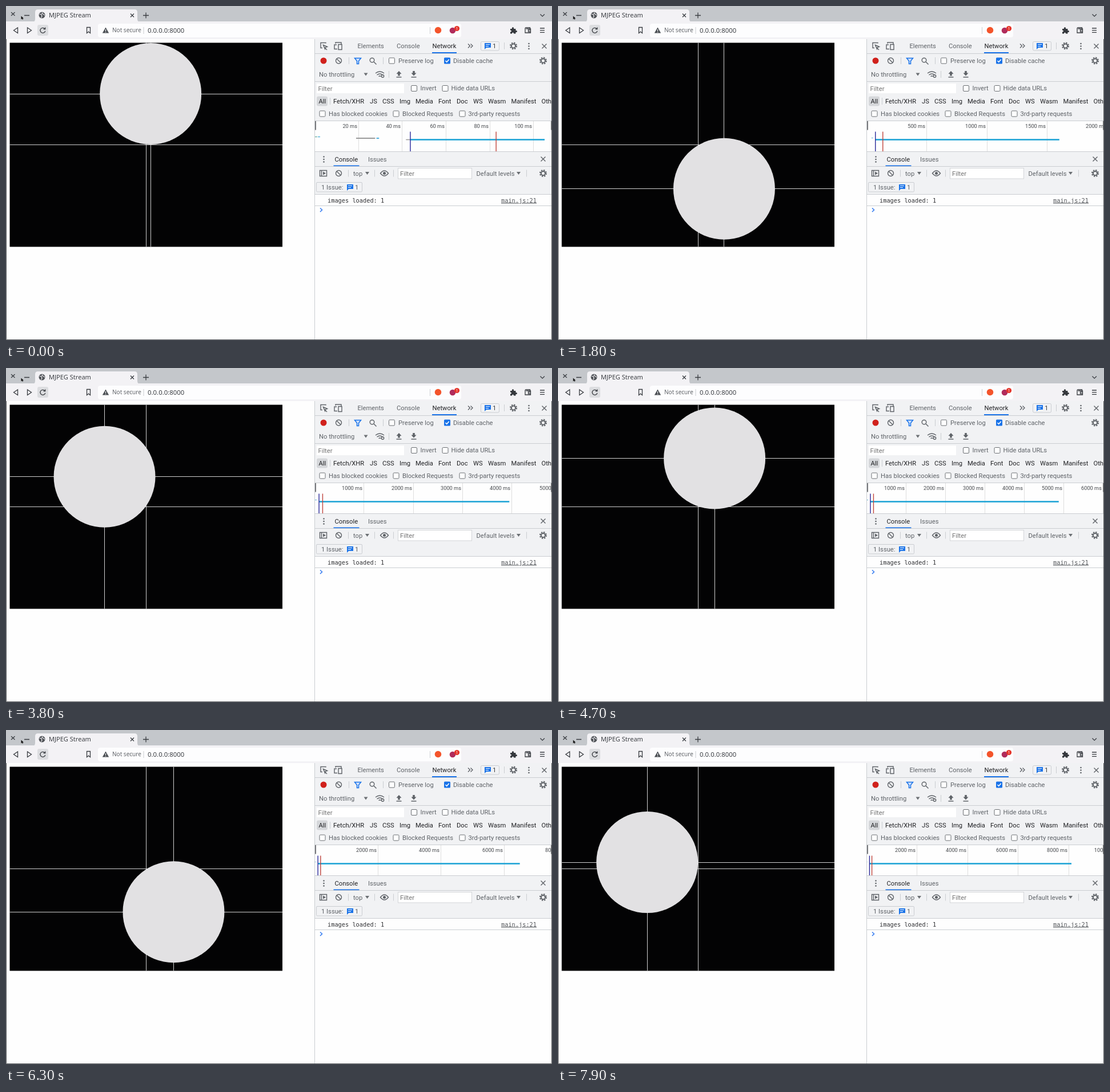
An HTML page that plays this animation: 956 by 586 pixels, repeating every 8000 ms.

```html
<!DOCTYPE html>
<html lang="en">
<head>
<meta charset="utf-8">
<title>MJPEG Stream</title>
<style>
  html, body { margin: 0; width: 100%; height: 100%; overflow: hidden; background: #fefefe; }
  svg { display: block; }
  text { font: 11.2px Roboto, Arial, sans-serif; fill: #5f6368; white-space: pre; }
  .ui { font-family: "Noto Sans", "Open Sans", sans-serif; fill: #3c3f44; }
  .dark { fill: #202124; }
  .mono { font: 10.3px "DejaVu Sans Mono", monospace; fill: #303134; }
  .tick { font-size: 9.25px; fill: #45484c; text-anchor: end; }
  .icon { fill: none; stroke: #5f6368; stroke-width: 1.4; }
  .ink { fill: none; stroke: #3a3d42; stroke-width: 1.3; }
  .rule { stroke: #cacdd1; fill: none; }
  .cross { stroke: #d0d0d0; fill: none; }
</style>
</head>
<body>
<svg width="956" height="586" viewBox="0 0 956 586">
  <defs>
    <clipPath id="view"><rect x="6.5" y="64.5" width="477.5" height="358"/></clipPath>
    <clipPath id="chart"><rect x="541" y="202" width="414" height="53"/></clipPath>
    <g id="gear" class="icon">
      <circle r="3.6" stroke-width="2"/>
      <circle r="5.5" stroke-width="2" stroke-dasharray="2.4 1.92"/>
    </g>
    <rect id="box" x="-5" y="-5" width="10" height="10" rx="1.5" fill="#fff" stroke="#6b6f73"/>
    <g id="ban" class="icon"><circle r="5"/><path d="M-3.5-3.5l7 7"/></g>
    <path id="close" class="icon" d="M-4-4l8 8M4-4l-8 8"/>
    <path id="drop" d="M-3.5-2.5h7l-3.5 5z" fill="#6b6f73"/>
    <g id="dots" fill="#5f6368"><circle cy="-4.5" r="1.3"/><circle r="1.3"/><circle cy="4.5" r="1.3"/></g>
    <g id="note">
      <path d="M-5.5-5h11v8h-8l-3 3z" fill="#1a73e8"/>
      <path d="M-3.5-2.5h7M-3.5 .5h5" stroke="#fff"/>
    </g>
    <path id="bar" class="rule" d="M0-6v12" stroke="#bbb"/>
  </defs>

  <!-- browser frame -->
  <rect width="956" height="586" fill="#fefefe"/>
  <rect width="956" height="28" fill="#c4c7cb"/>
  <path d="M46 28q5 0 5-5v-12q0-5 5-5h169q5 0 5 5v12q0 5 5 5z" fill="#f3f2f5"/>
  <rect y="27" width="956" height="31" fill="#f3f2f5"/>
  <rect x="161" y="31" width="636" height="24" rx="4" fill="#fdfdfe"/>
  <path class="ink" d="M9 11l6.500 6M15.500 11l-6.500 6M32 16.500h9" stroke="#555"/>
  <path d="M26.500 17.500v6l1.500-1.300 1 1.800 1-.5-.9-1.700h1.900z" fill="#111"/>
  <circle cx="63" cy="16" r="5.500" fill="#505358"/>
  <path d="M58.500 14l3.500 1 1 3-1.500 2.500M64 11.500l-1 2 3 1 1.500 2" fill="none" stroke="#f3f2f5" stroke-width="1.200"/>
  <text class="ui" x="75" y="20" style="font-size:11.050px">MJPEG Stream</text>
  <path class="ink" d="M218 13.500l6 6M224 13.500l-6 6M240 16.500h10M245 11.500v10" stroke-width="1.600"/>
  <path class="ink" d="M935.500 14.500l3.700 3.700 3.700-3.700" stroke-width="1.500"/>

  <path class="ink" d="M20.500 38v9.500l-7-4.700z"/>
  <path class="ink" d="M37.500 38v9.500l7-4.700z" stroke="#c3c5c8"/>
  <rect x="55" y="33" width="19" height="19" rx="3" fill="#dcdde0"/>
  <path class="ink" d="M68 40a4.500 4.500 0 1 0 .8 4M68.700 37.500v3.200h-3.200"/>
  <path class="ink" d="M141.500 37.500h6v10l-3-2.500-3 2.500z"/>
  <path d="M174.500 37.500l5.700 10h-11.400z" fill="#4c5055"/>
  <path d="M174.500 41v3M174.500 45v1.200" stroke="#fff" stroke-width="1.200"/>
  <text class="ui" x="186" y="46.300" style="font-size:10px;fill:#606368">Not secure</text>
  <use href="#bar" x="241" y="43"/>
  <text class="ui" x="248" y="46.500" style="font-size:11.400px">0.0.0.0:8000</text>
  <use href="#bar" x="742.500" y="43"/>
  <circle cx="756.500" cy="42.500" r="5.800" fill="#f4542b"/>
  <circle cx="782" cy="43" r="5.300" fill="#b02c5c"/>
  <circle cx="789.500" cy="39.500" r="4.600" fill="#e5352b"/>
  <text x="789.500" y="42" text-anchor="middle" style="font-size:6.500px;fill:#fff">1</text>
  <path d="M883 40h3q-.6-2.700 1.500-2.700t1.500 2.700h3.500v3q2.500-.5 2.500 1.500t-2.500 1.500v2.500h-3.500q0-2-1.500-2t-1.500 2h-3v-3q2-.3 2-1.500t-2-1.500z" fill="#35383d"/>
  <path class="ink" d="M909 39.500q0-1.500 1.500-1.500h7v2h-7M909 39.500v7.500h9.500v-7h-8M918.500 42h-4v3h4"/>
  <path class="ink" d="M935 39h8M935 42.700h8M935 46.400h8"/>

  <!-- streamed picture -->
  <g clip-path="url(#view)">
    <rect x="6" y="64" width="479" height="359" fill="#030304"/>
    <path class="cross" d="M6 243.500h478M245.500 64v359"/>
    <path class="cross" id="sight"/>
    <circle id="ball" r="89" fill="#e2e1e3"/>
  </g>

  <!-- inspector -->
  <rect x="540" y="58" width="416" height="273" fill="#f1f2f4"/>
  <path class="icon" d="M560 65.500v-1h-9v9h3M555.500 68.500l7 3-3 1-1 3z"/>
  <path class="icon" d="M557.500 72.500l4.500 4.500"/>
  <path class="icon" d="M577 66v-2h10v3M582 67.500h6v9h-6zM580 75.500h-5v-7.500h4"/>
  <text x="615.500" y="74">Elements</text>
  <text x="684" y="74">Console</text>
  <text class="dark" x="746.500" y="74">Network</text>
  <rect x="746" y="81" width="43" height="2" fill="#1a73e8"/>
  <path class="icon" d="M809 66.500l3.500 3.500-3.500 3.500M813.500 66.500l3.500 3.500-3.500 3.500"/>
  <rect class="rule" x="831.500" y="62.500" width="32" height="15.500" rx="2"/>
  <use href="#note" x="843.500" y="70"/>
  <text x="852" y="74" style="fill:#3c4043">1</text>
  <use href="#bar" x="872.500" y="70"/>
  <use href="#gear" x="888.500" y="70"/>
  <use href="#dots" x="915.500" y="70.500"/>
  <use href="#close" x="942.500" y="70.500"/>
  <path class="rule" d="M540 83.500h416"/>

  <circle cx="556" cy="96" r="5.500" fill="#d0211c"/>
  <use href="#ban" x="582.500" y="96"/>
  <use href="#bar" x="600.500" y="96"/>
  <path d="M610.500 91.500h11l-4 5v5h-3v-5z" fill="#d3e3fc" stroke="#1a73e8" stroke-width="1.500"/>
  <g class="icon"><circle cx="641" cy="95" r="3.800"/><path d="M644 98l4.500 4.500"/></g>
  <use href="#bar" x="660.500" y="96"/>
  <use href="#box" x="675.500" y="96"/>
  <text x="687" y="99.800">Preserve log</text>
  <rect x="767" y="90.500" width="11" height="11" rx="1.500" fill="#1a73e8"/>
  <path d="M769.500 96l2.200 2.300 4-4.500" fill="none" stroke="#fff" stroke-width="1.600"/>
  <text x="783" y="99.800">Disable cache</text>
  <use href="#gear" x="940.500" y="96"/>

  <text x="548" y="124">No throttling</text>
  <use href="#drop" x="630" y="120"/>
  <g class="icon">
    <path d="M647 118q7.500-6 15 0M649.500 121q5-4 10 0M652.500 123.500q2-1.500 4 0"/>
    <circle cx="659.500" cy="123" r="2.200"/>
  </g>
  <use href="#bar" x="670.500" y="120"/>
  <path d="M688 114l4.500 5h-2.700v3.500h-3.600v-3.500h-2.700zM683.500 124h9v1.500h-9z" fill="#5f6368"/>
  <path d="M714 122.500l4.500-5h-2.700v-3.500h-3.600v3.500h-2.700zM709.500 124h9v1.500h-9z" fill="#5f6368"/>
  <path class="rule" d="M540 132.500h416" stroke="#dcdee1"/>

  <rect x="544" y="136" width="153" height="17" fill="#fff"/>
  <text x="546.500" y="148.500" style="fill:#757575">Filter</text>
  <use href="#box" x="714.500" y="144.500"/>
  <text x="725.500" y="148.200">Invert</text>
  <use href="#box" x="769" y="144.500"/>
  <text x="779.500" y="148.200">Hide data URLs</text>

  <rect x="544" y="158.500" width="19" height="17" rx="3" fill="#d5d7da"/>
  <g id="kinds"></g>

  <use href="#box" x="554" y="189"/>
  <text x="565" y="192.800">Has blocked cookies</text>
  <use href="#box" x="683" y="189"/>
  <text x="694" y="192.800">Blocked Requests</text>
  <use href="#box" x="799" y="189"/>
  <text x="809.500" y="192.800">3rd-party requests</text>

  <rect x="540" y="201" width="416" height="55" fill="#fefefe"/>
  <path class="rule" d="M540 201.500h416M540 255.500h416"/>
  <g id="overview" clip-path="url(#chart)"></g>
  <path d="M542 202v15.500M955 202v15.500" stroke="#77797c" stroke-width="2"/>

  <!-- drawer -->
  <use href="#dots" x="556.500" y="269"/>
  <text class="dark" x="575.500" y="272.500">Console</text>
  <text x="634" y="272.500">Issues</text>
  <rect x="573.500" y="279.500" width="45" height="2" fill="#1a73e8"/>
  <use href="#close" x="940.500" y="268.500"/>
  <path class="rule" d="M540 281.500h416"/>
  <path class="icon" d="M549.500 288.500h12v10h-12zM552.500 288.500v10"/>
  <path d="M555 290.500l5 3-5 3z" fill="#5f6368"/>
  <use href="#ban" x="582.500" y="293.500"/>
  <use href="#bar" x="599.500" y="293.500"/>
  <text x="608" y="297.500">top</text>
  <use href="#drop" x="632.500" y="293.500"/>
  <use href="#bar" x="645.500" y="293.500"/>
  <path class="icon" d="M655.500 293.500q7-9 14 0q-7 9-14 0z"/>
  <circle cx="662.500" cy="293.500" r="2.500" fill="#5f6368"/>
  <use href="#bar" x="678.500" y="293.500"/>
  <rect x="686.500" y="284.500" width="129" height="18.500" fill="#fff" stroke="#d3d5d8"/>
  <text x="690" y="297.500" style="fill:#757575">Filter</text>
  <text x="823.500" y="297.500">Default levels</text>
  <use href="#drop" x="897.500" y="293.500"/>
  <use href="#bar" x="911.500" y="293.500"/>
  <use href="#gear" x="940.500" y="293.500"/>
  <rect class="rule" x="543.500" y="309.500" width="80" height="16.500" rx="1.500"/>
  <text x="552" y="322">1 Issue:</text>
  <use href="#note" x="602.500" y="318"/>
  <text x="611" y="322">1</text>
  <path class="rule" d="M540 330.500h416"/>
  <path class="rule" d="M541 350.500h414" stroke="#f3f3f3"/>
  <text class="mono" x="563" y="344.500">images loaded: 1</text>
  <text class="mono" x="867" y="344.500" text-decoration="underline" style="fill:#55585c">main.js:21</text>
  <path d="M550 354.500l3.500 3.300-3.500 3.300" fill="none" stroke="#367cf1" stroke-width="1.500"/>
  <path class="rule" d="M540.500 58v528"/>
  <path d="M.5 58v527.500h955v-527.500" fill="none" stroke="#55585b"/>
</svg>
<script>
  const LOOP = 8000, STEP = 100;
  const HUB = { x: 245.2, y: 243.5, r: 89.8 };
  const LEFT = 540.5, WIDTH = 411.7, MIN_GAP = 64;

  // [ms, degrees clockwise from the top]
  const TURN = [[0, 5.1], [1800, 149.4], [2700, 223.7], [3800, 306],
                [5600, 451.6], [7000, 563.4], [7900, 637.3]];
  // [ms, length of the running request in ms]
  const LENGTH = [[0, 105], [100, 250], [1400, 1600], [1800, 1600], [1900, 2060],
                  [2700, 2868], [3800, 3947], [5600, 5790], [7000, 7210], [7900, 8110]];

  const $ = id => document.getElementById(id);
  const mix = (a, b, u) => a + (b - a) * u;
  const snap = v => Math.floor(v) + 0.5;

  function at(points, t) {
    const i = Math.max(1, points.findIndex(p => p[0] >= t));
    const [t0, a] = points[i - 1], [t1, b] = points[i];
    return mix(a, b, (t - t0) / (t1 - t0));
  }

  const kinds = { All: 547.5, "Fetch/XHR": 573, JS: 637, CSS: 659, Img: 689, Media: 717, Font: 757,
                  Doc: 789, WS: 818, Wasm: 844, Manifest: 884.5, Other: 937.5 };
  $("kinds").innerHTML = Object.entries(kinds)
    .map(([name, x]) => `<text class="dark" x="${x}" y="171">${name}</text>`).join("") +
    '<path class="rule" d="M567.5 161v12"/>';

  function drawBall(t) {
    const a = at(TURN, t) * Math.PI / 180;
    const x = HUB.x + HUB.r * Math.sin(a), y = HUB.y - HUB.r * Math.cos(a);
    $("ball").setAttribute("cx", x);
    $("ball").setAttribute("cy", y);
    $("sight").setAttribute("d", `M6 ${snap(y)}h478M${snap(x)} 64v359`);
  }

  // Largest 1-2-10 division whose columns stay wider than the minimum gap
  function gridStep(span, scale) {
    const unit = 10 ** Math.ceil(Math.log10(span * MIN_GAP / WIDTH));
    if (unit * scale >= 5 * MIN_GAP) return unit / 5;
    if (unit * scale >= 2 * MIN_GAP) return unit / 2;
    return unit;
  }

  const stroke = (x1, x2, y, color, w) =>
    `<path d="M${x1} ${y}H${x2}" stroke="${color}" stroke-width="${w}"/>`;
  const marker = (x, color) =>
    `<path d="M${x} 220.5V255" stroke="${color}" stroke-width="1.4"/>`;

  function drawOverview(t) {
    const end = at(LENGTH, t);
    const zoom = Math.ceil(Math.log(end / 1000) / Math.log(1.25));
    const span = 1000 * 1.25 ** zoom, scale = WIDTH / span;
    const step = gridStep(span, scale);
    let out = "";
    for (let ms = step; ms < span + step; ms += step) {
      const x = snap(LEFT + ms * scale);
      out += `<path d="M${x} 202V255" stroke="#dedede"/>` +
             `<text class="tick" x="${x - 2.5}" y="213.5">${ms} ms</text>`;
    }
    const settle = Math.min(1, (zoom + 10) / 13);
    const ready = LEFT + 2.2 + mix(43.1, 62, settle) * scale;
    const loaded = LEFT + 4 + mix(81.8, 115, settle) * scale;
    const place = ms => LEFT + ms * scale;
    if (scale > 1) {
      out += stroke(541, 545, 229.5, "#7fb9a8", 1.5) + stroke(546, 550, 229.5, "#5ab4dc", 1.5) +
             stroke(place(18.9), place(27.6), 232, "#9a9a9a", 2) +
             stroke(place(28.2), place(29.4), 232, "#4fb0e0", 2);
    } else {
      out += stroke(ready - 7, ready - 4, 231.5, "#8cc5dd", 1.5);
    }
    out += stroke(ready - Math.min(8, 2 * scale), ready, 234.5, "#999", 1.5) +
           stroke(ready, place(end), 234.5, "#17a1d4", 2.4) +
           marker(ready, "#28289a") + marker(loaded, "#c0453c");
    $("overview").innerHTML = out;
  }

  let shown = -1;
  function tick() {
    const t = Math.floor(performance.now() % LOOP / STEP) * STEP;
    if (t !== shown) {
      shown = t;
      drawBall(t);
      drawOverview(t);
    }
    requestAnimationFrame(tick);
  }
  tick();
</script>
</body>
</html>
```
